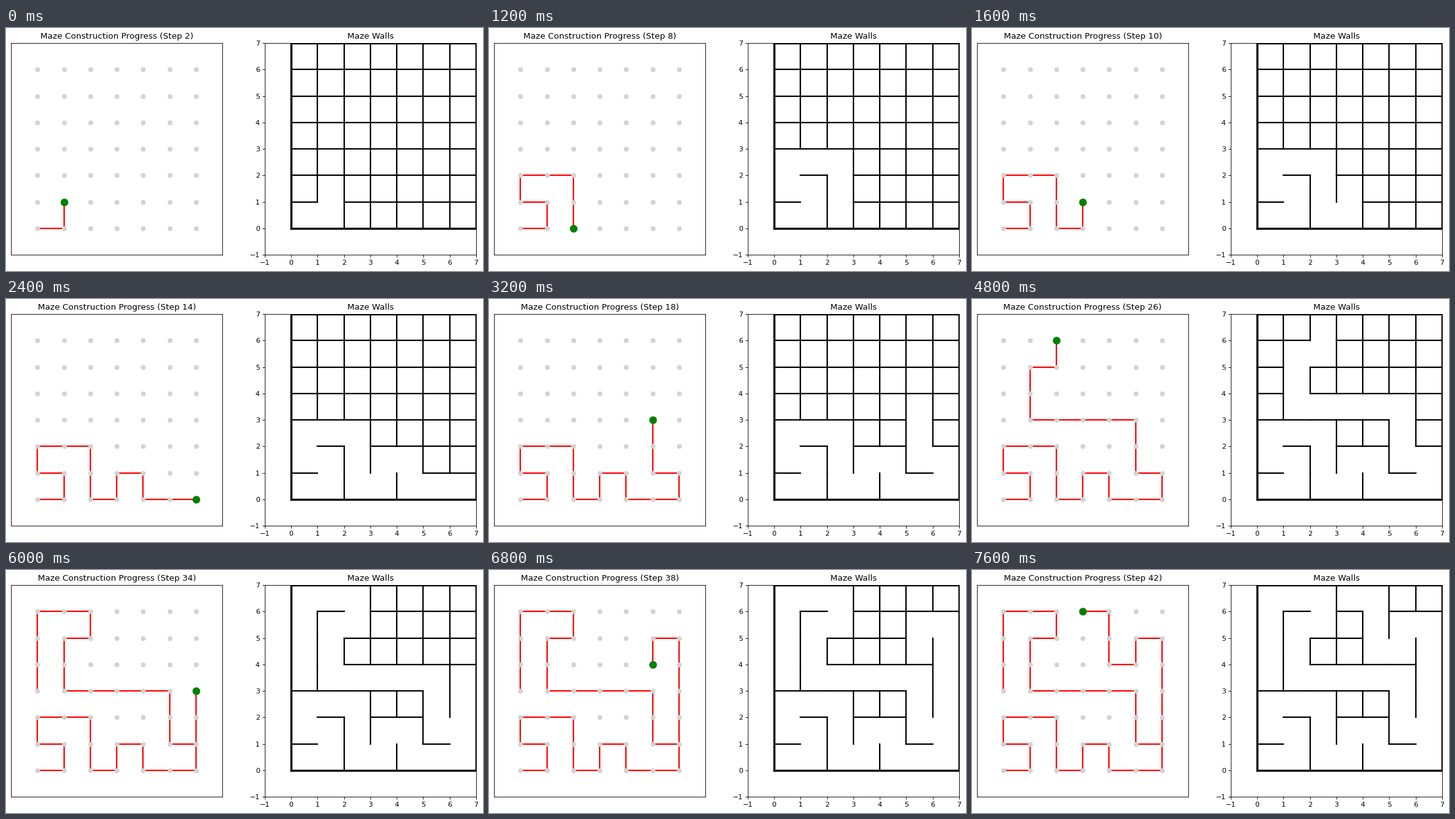
Animation of 763x388 px, one loop 8 s. Source, as a matplotlib script:

```python
import matplotlib.pyplot as plt
from matplotlib.animation import FuncAnimation

WIDTH, HEIGHT, DPI = 763, 388, 80
N = 7
SIDE, BOTTOM = 338.18, 25.78
FRAMES, INTERVAL = 20, 400
MOVES = {"R": (1, 0), "L": (-1, 0), "U": (0, 1), "D": (0, -1)}
TRUNK = "RULURRDD" "RURDRR" "ULUULLLL" "UURULLDDD"
BRANCH = "UUUULDLUUL"


def walk(start, moves):
    """Turn a string of moves into a list of (cell, next cell) edges."""
    edges = []
    x, y = start
    for move in moves:
        dx, dy = MOVES[move]
        edges.append(((x, y), (x + dx, y + dy)))
        x, y = x + dx, y + dy
    return edges


def wall_between(a, b):
    """Ends of the wall that separates two neighbouring cells."""
    x, y = max(a[0], b[0]), max(a[1], b[1])
    return ((x, y), (x, y + 1)) if a[1] == b[1] else ((x, y), (x + 1, y))


def segment(ax, ends, color, width):
    xs, ys = zip(*ends)
    return ax.plot(xs, ys, color=color, lw=width)[0]


def add_panel(left):
    ax = fig.add_axes([left / WIDTH, BOTTOM / HEIGHT, SIDE / WIDTH, SIDE / HEIGHT])
    ax.set_xlim(-1, N)
    ax.set_ylim(-1, N)
    return ax


plt.rcParams["font.family"] = "DejaVu Sans"
fig = plt.figure(figsize=(WIDTH / DPI, HEIGHT / DPI), dpi=DPI, facecolor="white")

# The branch starts where the trunk can be resumed after the dead end.
edges = walk((0, 0), TRUNK) + walk((6, 1), BRANCH)

grid_ax = add_panel(8.0)
grid_ax.set_xticks([])
grid_ax.set_yticks([])
title = grid_ax.set_title("", fontsize=12)
links = [segment(grid_ax, edge, "red", 2) for edge in edges]
cells = [(x, y) for x in range(N) for y in range(N)]
grid_ax.plot(*zip(*cells), "o", color="lightgray", ms=6)
head, = grid_ax.plot([], [], "o", color="green", ms=10)

wall_ax = add_panel(413.82)
wall_ax.set_title("Maze Walls", fontsize=12)
wall_ax.set_xticks(range(-1, N + 1))
wall_ax.set_yticks(range(-1, N + 1))
walls = {}
for x, y in cells:
    for neighbour in ((x + 1, y), (x, y + 1)):
        if max(neighbour) < N:
            ends = wall_between((x, y), neighbour)
            walls[ends] = segment(wall_ax, ends, "black", 2)
for k in (0, N):
    segment(wall_ax, ((0, k), (N, k)), "black", 3)
    segment(wall_ax, ((k, 0), (k, N)), "black", 3)


def update(frame):
    # Backtracking from the dead end takes one step and is not shown.
    step = 2 * frame + (2 if frame < 15 else 4)
    count = step - (step > len(TRUNK))
    title.set_text(f"Maze Construction Progress (Step {step})")
    for i, (edge, link) in enumerate(zip(edges, links)):
        link.set_visible(i < count)
        walls[wall_between(*edge)].set_visible(i >= count)
    x, y = edges[count - 1][1]
    head.set_data([x], [y])
    return [title, head]


anim = FuncAnimation(fig, update, frames=FRAMES, interval=INTERVAL, repeat=True)
plt.show()
```
